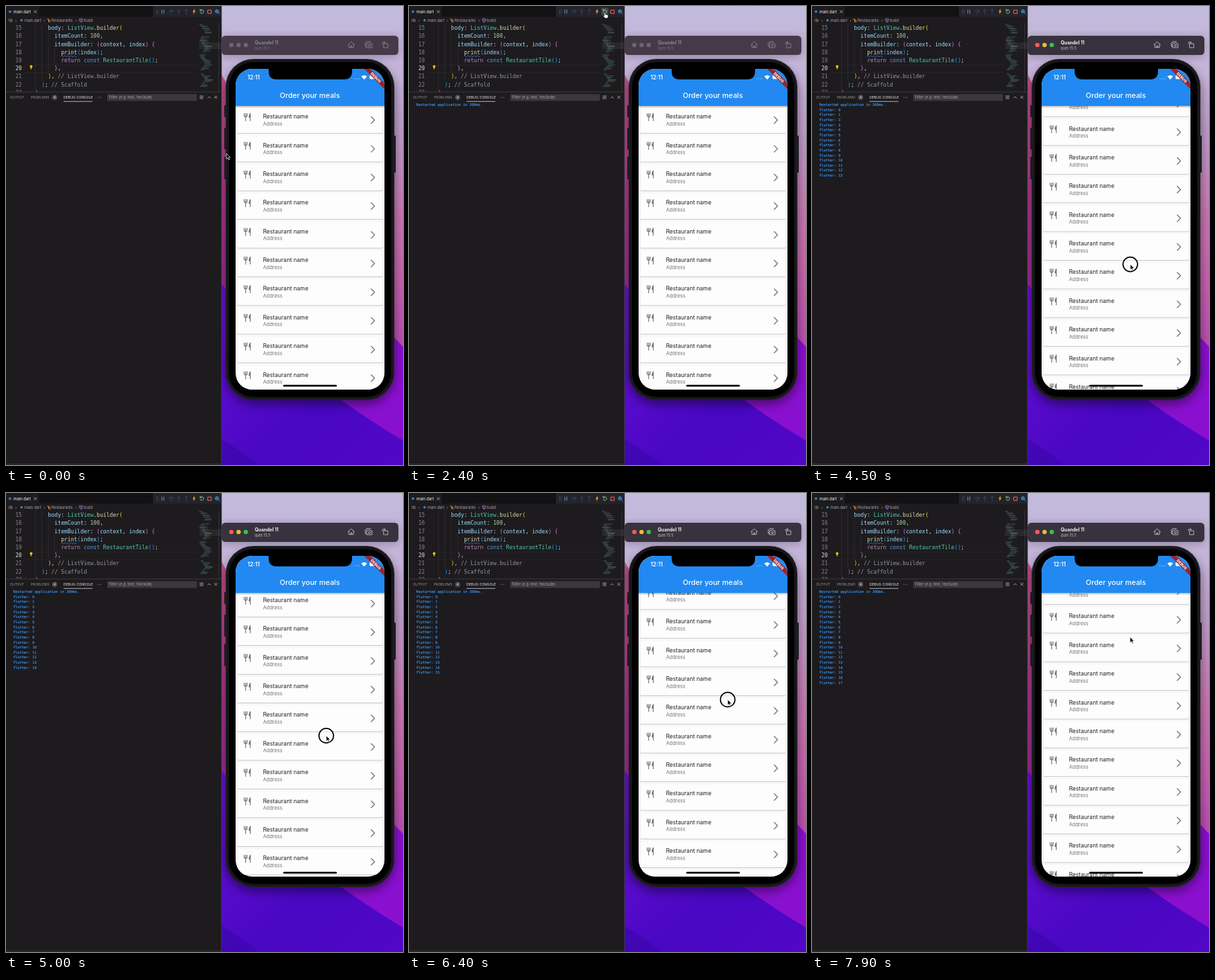
These frames come from a looping animation (600 px wide and 694 px high, 8000 ms). An HTML page:

```html
<!DOCTYPE html>
<html lang="en">
<head>
<meta charset="utf-8">
<title>List view demo</title>
<style>
html, body { margin: 0; width: 100%; height: 100%; overflow: hidden; background: #1d1b1e }
svg { display: block; width: 600px; height: 694px; font-family: Inter, Roboto, sans-serif }
text { white-space: pre }
.mono { font-family: "DejaVu Sans Mono", monospace }
.line { fill: none; stroke-linecap: round; stroke-linejoin: round }
</style>
</head>
<body>
<svg id="stage" viewBox="0 0 600 694">
  <defs>
    <linearGradient id="sky" x2="0" y2="1">
      <stop offset="0" stop-color="#c2bbdc"/><stop offset=".15" stop-color="#c4b2d8"/>
      <stop offset=".3" stop-color="#bd97c4"/><stop offset=".45" stop-color="#c878b2"/>
      <stop offset=".6" stop-color="#c562ae"/><stop offset=".75" stop-color="#b94cb0"/>
    </linearGradient>
    <linearGradient id="rose" x2="0" y2="1">
      <stop offset="0" stop-color="#c0508a"/><stop offset=".5" stop-color="#a8328f"/><stop offset="1" stop-color="#8a22a4"/>
    </linearGradient>
    <linearGradient id="violet" x2="1" y2="1">
      <stop offset="0" stop-color="#6a10d6"/><stop offset=".6" stop-color="#4807c2"/><stop offset="1" stop-color="#5207c6"/>
    </linearGradient>
    <linearGradient id="barShade" x2="0" y2="1">
      <stop offset="0" stop-opacity=".28"/><stop offset="1" stop-opacity="0"/>
    </linearGradient>
    <filter id="soft" x="-30%" y="-30%" width="160%" height="160%"><feGaussianBlur stdDeviation="7"/></filter>
    <filter id="edge" x="-5%" y="-20%" width="110%" height="150%"><feGaussianBlur stdDeviation=".7"/></filter>
    <clipPath id="right"><rect x="326" width="274" height="694"/></clipPath>
    <clipPath id="screen"><rect x="347" y="95" width="225" height="485" rx="25"/></clipPath>
    <clipPath id="editor"><rect y="26" width="326" height="104"/></clipPath>
    <g id="tile">
      <rect x="349.4" y="3" width="220.4" height="39" rx="2" fill="#000" opacity=".26" filter="url(#edge)"/>
      <rect x="349.2" y="2.2" width="220.6" height="39" rx="2" fill="#fefdfe"/>
      <g class="line" stroke="#757575" stroke-width="1.2">
        <path d="M360 11.5v3.2q0 1.7 2.2 1.7t2.2-1.7v-3.2M362.2 11.5v11"/>
        <path d="M369.2 11.4v11M368.9 12q-1.6 2-1.5 5.4h1.5" fill="#757575"/>
        <path d="M552 16.5l5 5-5 5" stroke-width="1.4"/>
      </g>
      <text x="388.4" y="19.2" font-size="8.6" fill="#212121">Restaurant name</text>
      <text x="388.4" y="29.8" font-size="7.5" fill="#757575">Address</text>
    </g>
  </defs>

  <g clip-path="url(#right)">
    <rect x="326" width="274" height="694" fill="url(#sky)"/>
    <path d="M326 104Q345 140 420 260L520 480V600H326z" fill="url(#rose)"/>
    <path d="M600 515L490 400V640L600 670z" fill="#8a10d0"/>
    <path d="M326 420Q420 550 600 657V694H326z" fill="url(#violet)"/>
    <path d="M326 655Q350 668 382 694H326z" fill="#3a05ab" opacity=".6"/>
    <rect x="330" y="86" width="259" height="518" rx="46" opacity=".38" filter="url(#soft)"/>
    <rect x="326" y="47" width="267" height="29" rx="6" opacity=".25" filter="url(#soft)"/>
  </g>

  <rect id="simBar" x="326" y="45" width="267" height="29" rx="5.5"/>
  <g id="lights"></g>
  <g id="simTitle">
    <text x="376" y="58.2" font-size="6.9" font-weight="700">Quandel 11</text>
    <text x="376" y="65.8" font-size="5.6" opacity=".75">qum 15.5</text>
  </g>
  <g id="simIcons" class="line" stroke-width=".9">
    <path d="M516.8 58.5l4.9-4.4 4.9 4.4M518.2 57.8v4.9h7v-4.9M521 62.5v-2.4h1.6v2.4"/>
    <path d="M545 55.5v-1.7h6M543 55.2v6h2M545.2 57h1.8l.8-1.2h2.6l.8 1.2h2v6h-8z"/>
    <circle cx="549.2" cy="59.8" r="1.5"/>
    <path d="M571 57h6v6h-6zM569 57v-2h4M571.6 53.6l1.5 1.4-1.5 1.4"/>
  </g>

  <g fill="#19181b">
    <rect x="330" y="150" width="4" height="18" rx="1"/><rect x="330" y="184" width="4" height="33" rx="1"/>
    <rect x="330" y="228" width="4" height="34" rx="1"/><rect x="585" y="196" width="4" height="56" rx="1"/>
  </g>
  <rect x="332" y="80" width="255" height="516" rx="42" fill="#232226"/>
  <rect x="333.4" y="81.4" width="252.2" height="513.2" rx="40.6" fill="#17161a"/>
  <rect x="337" y="85" width="245" height="506" rx="37" fill="#000"/>
  <g clip-path="url(#screen)">
    <rect x="347" y="95" width="225" height="485" fill="#f8f7f9"/>
    <g id="list"></g>
    <rect x="347" y="151" width="225" height="3.5" fill="url(#barShade)"/>
    <rect x="347" y="95" width="225" height="56" fill="#2189f1"/>
    <g fill="#fff">
      <text x="365" y="110.8" font-size="8.4" font-weight="600">12:11</text>
      <text x="459.2" y="139.4" font-size="11" font-weight="500" text-anchor="middle">Order your meals</text>
      <g opacity=".45"><circle cx="526" cy="110" r=".8"/><circle cx="528.6" cy="110" r=".8"/><circle cx="531.2" cy="110" r=".8"/><circle cx="533.8" cy="110" r=".8"/></g>
      <path d="M537 106.6q4.3-3.6 8.6 0l-4.3 4.6z"/>
      <rect x="549.5" y="104.6" width="12" height="6" rx="1.7"/>
    </g>
    <path d="M394 94q3 0 3 3v2q0 12 12 12h102q12 0 12-12v-2q0-3 3-3z"/>
    <g transform="translate(572 95) rotate(45)">
      <rect x="-26" y="15.2" width="52" height="6.6" fill="#982530"/>
      <text y="20.5" font-size="5.6" font-weight="800" fill="#fff" text-anchor="middle">DEBUG</text>
    </g>
    <rect x="419" y="572.8" width="81" height="2.8" rx="1.4"/>
  </g>

  <rect width="326" height="694" fill="#1d1b1e"/>
  <rect width="326" height="16" fill="#121114"/>
  <rect width="50" height="16" fill="#1d1b1e"/>
  <circle cx="6" cy="8.6" r="2" fill="#2f83bd"/>
  <path class="line" d="M42.5 6.8l3.6 3.6m0-3.6l-3.6 3.6" stroke="#ddd" stroke-width=".7"/>
  <g id="crumbs"></g>
  <g clip-path="url(#editor)">
    <path d="M28 89H289M28 100.5H289" stroke="#29272b" stroke-width=".6"/>
    <path d="M54.2 26V113M64 38V101M73.6 62V89M44.4 26V125" stroke="#39373b" stroke-width=".6"/>
    <g id="code" class="mono" font-size="8.13"></g>
    <path class="line" d="M83 76q1.2-2 2.4 0t2.4 0 2.4 0 2.4 0 2.4 0 2.4 0 2.4 0 2.4 0 2.4 0 2.4 0" stroke="#3794ff" stroke-width=".7"/>
    <circle cx="38" cy="91.5" r="2" fill="#ffcc00"/><rect x="37" y="93.7" width="2" height="1.5" fill="#ffcc00"/>
    <g id="map"></g>
    <path d="M321.5 26V130" stroke="#343237"/>
    <rect x="292" y="55" width="34" height="10" fill="#fff" opacity=".06"/>
  </g>
  <rect x="222" width="104" height="16.5" fill="#25232a"/>
  <rect id="hover" x="290.5" y="2.5" width="11" height="11.5" rx="2" fill="#45434a"/>
  <g class="line" stroke-width="1">
    <path d="M227.5 6v5m2.4-5v5" stroke="#66646a" stroke-dasharray=".3 2"/>
    <path d="M235.6 6v5m3-5v5" stroke="#4ba3e8"/>
    <g stroke="#2b4d6c"><path d="M246 9q3-5.5 6-.5m0-2.5v2.6h-2.6"/><path d="M261 5v4m-1.8-1.8l1.8 1.8 1.8-1.8"/><path d="M272.4 9V5m-1.8 1.8l1.8-1.8 1.8 1.8"/></g>
    <g fill="#2b4d6c"><circle cx="249" cy="11.3" r=".9"/><circle cx="261" cy="11.6" r=".9"/><circle cx="272.4" cy="11.6" r=".9"/></g>
    <path d="M284.6 5l-2 3.8h1.6l-.8 3 2.4-4.2h-1.6z" fill="#ffc328" stroke="#ffc328" stroke-width=".4"/>
    <path d="M294 6.6a2.7 2.7 0 1 1-.5 2.9M293.4 4.8v2.2h2.2" stroke="#7fd08a"/>
    <rect x="305.2" y="6.2" width="5" height="5" stroke="#f0715c"/>
    <circle cx="318.8" cy="8" r="2.5" stroke="#3d9be9"/><path d="M320.8 10l2 2M318.8 6.6v2.8M317.4 8h2.8" stroke="#3d9be9"/>
  </g>

  <path d="M0 130H326" stroke="#454348" stroke-width=".8"/>
  <g id="tabs"></g>
  <path d="M87 144.3H130.5" stroke="#d8d8d8" stroke-width=".8"/>
  <circle cx="73.5" cy="138.2" r="4" fill="#4b4a4e"/>
  <text x="73.5" y="140.2" font-size="5.2" fill="#fff" text-anchor="middle">4</text>
  <rect x="153" y="133.3" width="135.5" height="10.2" fill="#3a383c"/>
  <text x="155.5" y="140.4" font-size="5.6" fill="#a5a4a8">Filter (e.g. text, !exclude)</text>
  <g class="line" stroke="#bbb" stroke-width=".8">
    <path d="M293 136h5m-5 2h5m-5 2h2.5m1 0h1.5"/><path d="M305 139.2l2.1-2.2 2.1 2.2"/><path d="M315.2 136l4 4m0-4l-4 4"/>
    <path d="M138.7 138.2h.1m2.3 0h.1m2.3 0h.1"/>
  </g>
  <g id="log" class="mono" font-size="5.36" fill="#3794f4" stroke="#3794f4" stroke-width=".15"></g>
  <path d="M0 692.5H326" stroke="#38363b"/>
  <path d="M325.7 0V694" stroke="#464349" stroke-width=".8"/>

  <circle id="touch" r="11" fill="#fff" fill-opacity=".35" stroke="#000" stroke-width="1.7"/>
  <g id="pointer">
    <path id="arrow" d="M0 0v8.4l2-1.9 1.4 3.2 1.4-.6-1.4-3.1h2.7z" fill="#000" stroke="#fff" stroke-width=".7"/>
    <path id="hand" d="M-1-2.5q1-1 1.9 0v3l3.3.9q1.2.5.9 2L4.3 6.6H.1L-2.7 2.8q.4-1.2 1.7-.2z" fill="#fff" stroke="#000" stroke-width=".7"/>
  </g>
</svg>
<script>
const LOOP = 8000, PITCH = 43.37, TOUCH_Y = 419, SLOP = 3.4;
const $ = id => document.getElementById(id);
const text = (x, y, size, fill, str, more = '') =>
  `<text x="${x}" y="${y}" font-size="${size}" fill="${fill}" ${more}>${str}</text>`;

// Editor header and panel tabs
$('crumbs').innerHTML =
  text(11.3, 10.7, 5.9, '#fff', 'main.dart') +
  [[4, 'lib'], [14, '›'], [28, 'main.dart'], [57, '›'], [69, 'Restaurants'], [105, '›'], [118, 'build']]
    .map(([x, s]) => text(x, 23.6, 5.7, '#a9a8ab', s)).join('') +
  '<circle cx="23.5" cy="21.6" r="1.9" fill="#2f83bd"/>' +
  '<path class="line" d="M62.5 20h2v4h2.5M64.5 21.5h2.5" stroke="#ee9d28"/>' +
  '<path class="line" d="M113.5 18.8l2.5 1.3v3l-2.5 1.3-2.5-1.3v-3zM111 20.1l2.5 1.2 2.5-1.2M113.5 21.3v3" stroke="#b180d7" stroke-width=".7"/>';
$('tabs').innerHTML =
  text(6, 140, 5.2, '#99989b', 'OUTPUT') +
  text(37.5, 140, 5.2, '#99989b', 'PROBLEMS') +
  text(87, 140, 5.2, '#f0f0f0', 'DEBUG CONSOLE');

// Code: each line is an indent followed by colour key / text pairs
const ink = { v: '#9cdcfe', w: '#d4d4d4', t: '#4ec9b0', f: '#dcdcaa', n: '#b5cea8', k: '#c586c0',
  c: '#569cd6', g: '#969696', y: '#ffd700', p: '#da70d6', b: '#179fff' };
const code = [
  [4, 'v', 'body', 'w', ': ', 't', 'ListView', 'w', '.', 'f', 'builder', 'y', '('],
  [6, 'v', 'itemCount', 'w', ': ', 'n', '100', 'w', ','],
  [6, 'v', 'itemBuilder', 'w', ': ', 'p', '(', 'v', 'context', 'w', ', ', 'v', 'index', 'p', ') {'],
  [8, 'f', 'print', 'b', '(', 'v', 'index', 'b', ')', 'w', ';'],
  [8, 'k', 'return ', 'c', 'const ', 't', 'RestaurantTile', 'b', '()', 'w', ';'],
  [6, 'p', '}', 'w', ','],
  [4, 'y', ')', 'w', ', ', 'g', '// ListView.builder'],
  [2, 'b', ')', 'w', '; ', 'g', '// Scaffold'],
  [0, 'p', '}']
];
$('code').innerHTML = code.map(([indent, ...parts], i) => {
  const y = 36.2 + i * 12.2;
  let spans = '';
  for (let j = 0; j < parts.length; j += 2)
    spans += `<tspan fill="${ink[parts[j]]}">${parts[j + 1]}</tspan>`;
  return text(24, y, 8.13, i === 5 ? '#e0e0e0' : '#858585', 15 + i, 'text-anchor="end"') +
    `<text x="${44 + indent * 4.895}" y="${y}">${spans}</text>`;
}).join('');

// Minimap from seeded strokes
let seed = 7;
const rnd = () => (seed = seed * 16807 % 2147483647) / 2147483647;
const hues = ['#4ec9b0', '#4ec9b0', '#9cdcfe', '#858585', '#dcdcaa'];
let map = '';
for (let y = 27; y < 122; y += 1.5) {
  const depth = Math.abs((y - 27) % 24 - 12) / 2;
  if ((y > 41 && y < 46) || (y > 69 && y < 73) || (y > 97 && y < 101)) continue;
  map += `<rect x="${292 + (6 - depth) * 1.5}" y="${y}" width="${3 + rnd() * 10}" height=".7" opacity=".4" fill="${hues[rnd() * 5 | 0]}"/>`;
}
$('map').innerHTML = map;

$('list').innerHTML = Array.from({ length: 18 }, (_, i) =>
  `<use href="#tile" y="${i * PITCH}"/>`).join('');
$('log').innerHTML = Array.from({ length: 19 }, (_, i) =>
  `<text x="10.8" y="${150.9 + i * 7.66}">${i ? 'flutter: ' + (i - 1) : 'Restarted application in 309ms.'}</text>`).join('');
const logLines = [...$('log').children];

const show = (id, on) => $(id).setAttribute('visibility', on ? 'visible' : 'hidden');

// Pointer path: time, x, y, eased into the stop
const path = [
  [0, 333, 223, 0], [500, 333, 223, 0], [1500, 296, 12, 1], [2600, 296, 12, 0], [3500, 477.5, 419, 1],
  [3900, 477.5, 419, 0], [5000, 484, 367, 0], [5800, 483.3, 338, 0], [7000, 480, 287, 0], [7900, 480.7, 218, 0], [8000, 480.7, 217, 0]
];
function pointerAt(t) {
  const i = path.findIndex(p => p[0] > t), a = path[i - 1], b = path[i];
  let u = (t - a[0]) / (b[0] - a[0]);
  if (b[3]) u = u * u * (3 - 2 * u);
  return [a[1] + (b[1] - a[1]) * u, a[2] + (b[2] - a[2]) * u];
}

function setWindow(active) {
  $('simBar').setAttribute('fill', active ? '#38323e' : '#463a48');
  $('simTitle').setAttribute('fill', active ? '#f2eff4' : '#8b8492');
  $('simIcons').setAttribute('stroke', active ? '#c5bfca' : '#8b8492');
  const colors = active ? ['#fc5b57', '#e5bf3c', '#35c24a'] : ['#6d6574', '#6d6574', '#6d6574'];
  $('lights').innerHTML = colors.map((c, i) =>
    `<circle cx="${340.6 + i * 10.9}" cy="59" r="3.3" fill="${c}"/>`).join('');
}

function draw(now) {
  const t = now % LOOP, [x, y] = pointerAt(t);
  const scroll = t > 3900 ? Math.max(0, TOUCH_Y - y - SLOP) : 0;
  const newest = 13 + Math.floor((scroll + .7) / PITCH);
  const count = t < 2300 ? 0 : t < 2500 ? 1 : newest + 2;
  logLines.forEach((el, i) => el.style.display = i < count ? '' : 'none');
  $('list').setAttribute('transform', `translate(0 ${151 - scroll})`);
  const over = y < 16;
  show('hover', over);
  show('hand', over);
  show('arrow', !over);
  $('pointer').setAttribute('transform', `translate(${x} ${y})`);
  $('touch').setAttribute('transform', `translate(${x} ${y})`);
  show('touch', t >= 3700 && t < 7800);
  setWindow(t >= 3700);
  requestAnimationFrame(draw);
}
requestAnimationFrame(draw);
</script>
</body>
</html>
```
